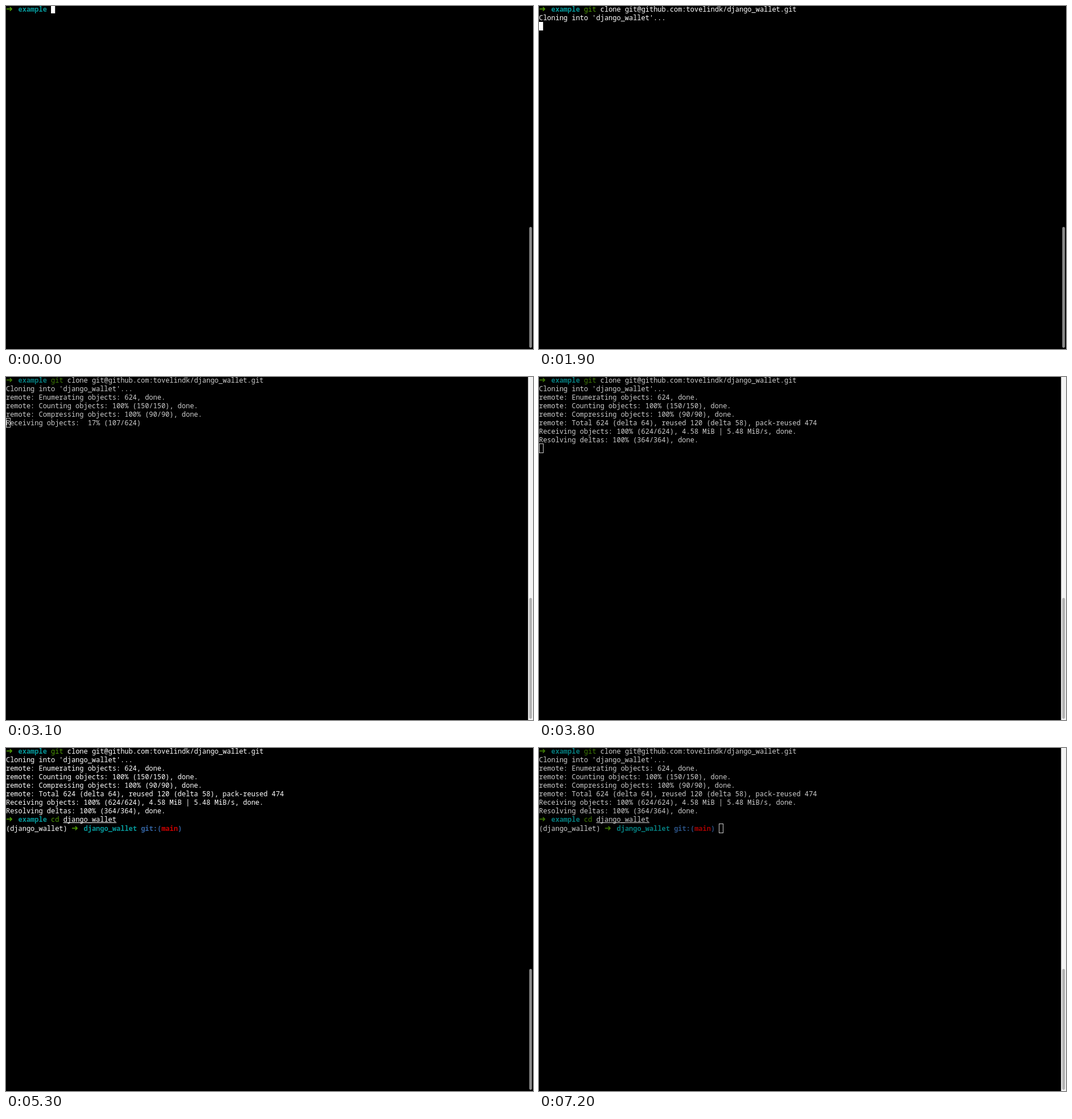
Write an HTML page with a canvas that moves like this. It is 926x604 px and loops after 8000 ms.

```html
<!DOCTYPE html>
<html lang="en">
<head>
<meta charset="utf-8">
<title>Terminal</title>
<style>
  html, body { margin: 0; width: 100%; height: 100%; overflow: hidden; background: #000; }
  canvas { display: block; }
</style>
</head>
<body>
<canvas id="term" width="926" height="604"></canvas>
<script>
const ctx = document.getElementById('term').getContext('2d');
const LOOP = 8000, W = 926, H = 604;
const CELL = 7.1875, LINE = 15.08, TOP = -2.15, BASE = 12;
const FONT = '11.98px "Noto Sans Mono", "DejaVu Sans Mono", monospace';
const ARROW_FONT = '14.375px "DejaVu Sans", sans-serif';
const WHITE = '#fff', GREEN = '#4e9a06', TEAL = '#06989a', BLUE = '#3465a4', RED = '#cc0000';

const clamp = v => Math.max(0, Math.min(1, v));
const mix = (a, b, k) => Math.round(a + (b - a) * k);
const grey = v => `rgb(${v},${v},${v})`;
const rowTop = row => TOP + row * LINE;

function put(row, col, text, color = WHITE, bold = false) {
  ctx.font = (bold ? 'bold ' : '') + FONT;
  ctx.fillStyle = color;
  ctx.fillText(text, col * CELL, rowTop(row) + BASE);
}

function prompt(row, col, dir) {
  ctx.font = ARROW_FONT;
  ctx.fillStyle = GREEN;
  ctx.fillText('➜', col * CELL, rowTop(row) + BASE);
  put(row, col + 3, dir, TEAL, true);
}

function cursor(row, col, hollow) {
  const x = col * CELL, y = rowTop(row);
  if (hollow) {
    ctx.strokeStyle = WHITE;
    ctx.lineWidth = 1;
    ctx.strokeRect(Math.round(x) + 0.5, Math.round(y) - 0.5, 7, 16);
  } else {
    ctx.fillStyle = WHITE;
    ctx.fillRect(x, y, CELL, LINE);
  }
}

// 0 while the window has focus, 1 in the background
function dimAt(t) {
  if (t < 3900) return clamp((t - 2400) / 200);
  if (t < 6900) return 1 - clamp((t - 3900) / 300);
  return clamp((t - 6950) / 250);
}

function cursorPos(t) {
  if (t < 400) return [0, 11];
  if (t < 800) return [0, 63];
  if (t < 2800) return [2, 0];
  if (t < 3800) return [5, 0];
  if (t < 3900) return [8, 0];
  if (t < 4800) return [8, 11];
  if (t < 5100) return [8, 27];
  if (t < 5200) return [9, 0];
  return [9, 44];
}

const HIDDEN = [[200, 700], [1300, 1900], [2400, 2500], [5200, 5400], [5800, 6400], [6900, 7000]];

function cloneOutput(t) {
  if (t >= 800) put(1, 0, "Cloning into 'django_wallet'...");
  if (t < 2800) return;
  put(2, 0, 'remote: Enumerating objects: 624, done.');
  put(3, 0, 'remote: Counting objects: 100% (150/150), done.');
  put(4, 0, 'remote: Compressing objects: 100% (90/90), done.');
  if (t >= 3800) {
    put(5, 0, 'remote: Total 624 (delta 64), reused 120 (delta 58), pack-reused 474');
    put(6, 0, 'Receiving objects: 100% (624/624), 4.58 MiB | 5.48 MiB/s, done.');
    put(7, 0, 'Resolving deltas: 100% (364/364), done.');
  } else if (t >= 2900) {
    const count = t < 3100 ? 1 : t < 3600 ? 107 : 288;
    const percent = String(Math.floor(count / 6.24)).padStart(3);
    const rate = t < 3600 ? '' : ', 924.00 KiB | 1.74 MiB/s';
    put(5, 0, `Receiving objects: ${percent}% (${count}/624)${rate}`);
  }
}

function changeDir(t) {
  if (t >= 3900) prompt(8, 0, 'example');
  if (t >= 4800) {
    put(8, 11, 'cd', GREEN);
    put(8, 14, 'django_wallet');
    ctx.fillStyle = WHITE;
    ctx.fillRect(14 * CELL, 131, 13 * CELL, 1);
  }
  if (t >= 5200) put(9, 0, '(django_wallet)');
  if (t >= 5300) {
    prompt(9, 16, 'django_wallet');
    put(9, 33, 'git:(', BLUE, true);
    put(9, 38, 'main', RED, true);
    put(9, 42, ')', BLUE, true);
  }
}

function scrollbar(dim) {
  ctx.fillStyle = grey(mix(0, 244, dim));
  ctx.fillRect(917.3, 0, W - 917.3, H);
  ctx.fillStyle = grey(mix(138, 178, dim));
  ctx.beginPath();
  ctx.roundRect(919.4, 389, 4.8, 213, 2.4);
  ctx.fill();
}

function draw(t) {
  const dim = dimAt(t);
  ctx.globalAlpha = 1;
  ctx.fillStyle = '#000';
  ctx.fillRect(0, 0, W, H);
  scrollbar(dim);

  ctx.globalAlpha = 1 - 0.2 * dim;
  prompt(0, 0, 'example');
  if (t >= 400) {
    put(0, 11, 'git', GREEN);
    put(0, 15, 'clone git@github.com:tovelindk/django_wallet.git');
  }
  cloneOutput(t);
  changeDir(t);
  if (!HIDDEN.some(([from, to]) => t >= from && t < to)) {
    const hollow = (t >= 2500 && t < 4000) || t >= 7000;
    cursor(...cursorPos(t), hollow);
  }
}

const start = performance.now();
function frame() {
  const t = (performance.now() - start) % LOOP;
  draw(Math.floor(t / 100) * 100);
  requestAnimationFrame(frame);
}
frame();
</script>
</body>
</html>
```
